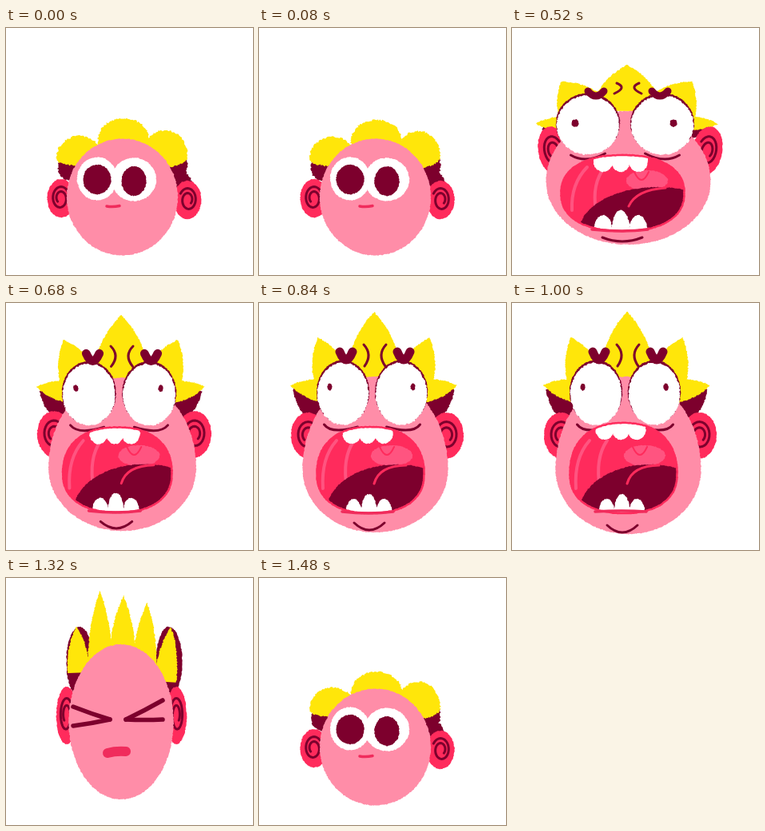
An HTML page with a canvas that plays this animation: 309x309 px, repeating every 1.56 s.

```html
<!DOCTYPE html>
<html lang="en">
<head>
<meta charset="utf-8">
<title>Scream</title>
<style>
html, body { margin: 0; width: 100%; height: 100%; overflow: hidden; background: #fff; }
canvas { display: block; width: 100vw; height: 100vh; }
</style>
</head>
<body>
<canvas id="stage" width="309" height="309"></canvas>
<script>
const ctx = document.getElementById('stage').getContext('2d');
const PINK = '#ff8da8', YELLOW = '#ffe60a', DARK = '#7d002d', RED = '#ff2b5c',
  LIGHT = '#ff5480', LIP = '#f02c5c', WHITE = '#fff';
const LOOP = 1560;

let state = 1;
const seed = n => { state = n * 7919 + 17; };
function rand() {
  state = (state * 1664525 + 1013904223) >>> 0;
  return state / 4294967296;
}
const both = draw => [-1, 1].forEach(draw);

function saved(draw) {
  ctx.save();
  draw();
  ctx.restore();
}

// Path of a function of u in 0..1, with chalky jitter.
function trace(point, steps, fuzz = 0) {
  ctx.beginPath();
  for (let i = 0; i <= steps; i++) {
    const [x, y] = point(i / steps);
    ctx.lineTo(x + (rand() - .5) * fuzz, y + (rand() - .5) * fuzz);
  }
}

function fill(color) {
  ctx.fillStyle = color;
  ctx.fill();
}

function stroke(color, width) {
  ctx.strokeStyle = color;
  ctx.lineWidth = width;
  ctx.lineCap = ctx.lineJoin = 'round';
  ctx.stroke();
}

// Oval whose upper and lower halves differ in height; a power above 2 squares it off.
function eggPath(x, y, rx, top, bottom, fuzz = 1, power = 2) {
  const round = v => Math.sign(v) * Math.abs(v) ** (2 / power);
  trace(u => {
    const c = Math.cos(u * 2 * Math.PI), s = Math.sin(u * 2 * Math.PI);
    return [x + rx * round(c), y + (s < 0 ? top : bottom) * round(s)];
  }, Math.ceil(5 * (rx + (top + bottom) / 2) / 2), fuzz);
  ctx.closePath();
}

function egg(x, y, rx, top, bottom, color, fuzz) {
  eggPath(x, y, rx, top, bottom, fuzz);
  fill(color);
}

const oval = (x, y, rx, ry, color, fuzz) => egg(x, y, rx, ry, ry, color, fuzz);

// Pointed hair tuft from a base centre to its tip.
function petal(x, y, tipX, tipY, half, color) {
  const len = Math.hypot(tipX - x, tipY - y);
  const nx = (y - tipY) / len * half, ny = (tipX - x) / len * half;
  trace(u => {
    const v = 2 * u - 1, s = -Math.sign(v), k = 1 - Math.abs(v);
    const w = s * (1 - k * k), h = 1.2 * k * (1 - k) + k * k;
    return [x + (tipX - x) * h + nx * w, y + (tipY - y) * h + ny * w];
  }, Math.ceil(len * 2), 1.4);
  fill(color);
}

// Stroke from a to c that passes through b.
function bend(ax, ay, bx, by, cx, cy, color, width) {
  ctx.beginPath();
  ctx.moveTo(ax, ay);
  ctx.quadraticCurveTo(2 * bx - (ax + cx) / 2, 2 * by - (ay + cy) / 2, cx, cy);
  stroke(color, width);
}

function ear(side, x, y, rx, ry, lean = 0) {
  saved(() => {
    ctx.translate(x, y);
    ctx.scale(side, 1);
    ctx.rotate(lean);
    oval(0, 0, rx, ry, RED);
    trace(u => {
      const a = -2.6 + u * 9.6, r = .64 - .38 * u;
      return [rx * (.05 + r * Math.cos(a)), ry * r * Math.sin(a)];
    }, 40);
    stroke(DARK, 3);
  });
}

function squint(x, y, gap, reach, up, down, tilt, width) {
  both(s => [up, down].forEach(dy => {
    const endX = x + s * reach, endY = y + dy - s * tilt;
    bend(x + s * gap, y, (x + s * gap + endX) / 2, (y + endY) / 2 + .5, endX, endY, DARK, width);
  }));
}

function calm({ sx = 1, sy = 1, lift = 0 }) {
  saved(() => {
    ctx.translate(147.5, 211);
    ctx.scale(sx, sy);
    ctx.translate(-147.5, -211);
    oval(80, 175, 15, 16, DARK, 2);
    oval(212, 172, 15, 20, DARK, 2);
    oval(219, 194, 13, 14, DARK, 2);
    egg(92, 163 + lift / 2, 29, 28, 9, YELLOW, 2.2);
    egg(147, 140 + lift, 32, 27, 30, YELLOW, 2.2);
    egg(199, 160 + lift / 2, 28, 32, 14, YELLOW, 2.2);
    both(s => ear(s, 148 + s * 79, 214 + s, 17.5, 24));
    oval(145.5, 211.5, 69.5, 73, PINK);
  });
  if (sx > 1) {
    squint(135, 196.5, 3, 49 * sx, -9, 1, 2.5, 4.5);
    bend(125, 222, 134, 222, 143, 221, LIP, 4.5);
  } else {
    both(s => oval(137 + s * 23, 189 + s / 2, 26.5 + s * 1.5, 27, WHITE));
    both(s => oval(137 + s * 23, 190.5 + s, 16.5 - s, 18.5, DARK));
    bend(126, 223, 134, 223.5, 142, 222.5, LIP, 3.5);
  }
}

function squeezed() {
  both(s => oval(148 + s * 56, 105, 16.5, 44, DARK));
  [61, 16, 22, 31, 61].forEach((tipY, i) => {
    const k = i - 2;
    petal(145 + k * 27, 124 + k * 3, 147 + k * 29.5, tipY, 18 - Math.abs(k) * 2, YELLOW);
  });
  both(s => ear(s, 144.5 + s * 68.5, 172, 13, 36));
  oval(144, 180, 65.5, 97, PINK);
  squint(140, 177, 10, 56, -20, 4, 4, 5.5);
  bend(127, 219, 138, 217, 150, 217, LIP, 12);
}

// t = 0 is the wide scream, t = 1 the tall one.
function scream({ t = 1, sy = 1, shake = 0 }) {
  const m = (wide, tall) => wide + (tall - wide) * t;
  const mid = 141.5, top = m(159, 155) - shake * 5, base = m(254, 263);
  const eyeX = m(46.5, 36.5), eyeY = m(121.5, 113.5), rx = m(39, 32), ry = m(37, 39);

  ctx.translate(0, 7);
  ctx.scale(1, sy);
  ctx.translate(0, -7);

  both(s => petal(143.5 + s * m(70, 58), m(125, 134), 143.5 + s * m(106, 101), m(126, 108), m(14, 24), DARK));
  both(s => petal(143.5 + s * m(46, 46), m(118, 108), 143.5 + s * m(82, 70), m(67, 43), m(34, 25), YELLOW));
  petal(144, 104, 144, m(46, 11), m(42, 35), YELLOW);
  both(s => petal(143.5 + s * m(75, 60), m(119, 111), 143.5 + s * m(114, 104), m(120, 103), m(9, 14), YELLOW));
  both(s => ear(s, 148 + s * m(96, 86), m(154, 166), m(19, 22), m(31, 29), m(.2, .05)));
  egg(145.5, m(192, 208), m(103, 91), m(88, 116), m(79, 79) + shake * 2, PINK);

  both(s => {
    const x = mid + s * eyeX, fold = 145 + s * m(14, 14), brow = mid + 3.5 + s * m(40, 36);
    oval(x, eyeY - 2, rx + 1, ry + 1, DARK);
    oval(x, eyeY, rx, ry, WHITE, 1.6);
    oval(mid - 1 + s * m(61.5, 52), m(119, 105), m(4.5, 3), m(4.5, 4.5), DARK);
    bend(brow - m(10, 8), m(79, 61), brow, m(85, 71), brow + m(10, 8), m(79, 61), DARK, m(9, 11));
    bend(fold, m(69, 52), 145 + s * 8, m(75, 65), 145 + s * m(17, 13), m(82, 79), DARK, 3);
    bend(mid + s * m(68, 60), m(159, 152), mid + s * m(48, 45), m(164, 159),
      mid + s * m(25, 18), m(157, 155), DARK, 3);
  });

  const mouthX = m(138.5, 139.5), mouthY = m(207, 214);
  const mouth = () => eggPath(mouthX, mouthY, m(77, 67), mouthY - top, base - mouthY, .6, 2.3);
  mouth();
  fill(RED);
  saved(() => {
    ctx.clip();
    both(s => bend(m(105, 108) + s * 11, m(174, 172), m(92, 96) + s * 13, 198,
      m(90, 95) + s * 15, m(228, 232), LIGHT, 4));
    oval(m(169, 166), 191, 26, 13, LIGHT);
    bend(m(153, 151), 180, m(162, 160), 190, m(171, 169), 180, RED, 2);
    oval(m(182, 172), m(255, 262), m(98, 88), m(56, 60), DARK);
    bend(m(146, 144), m(223, 226), m(162, 157), m(207, 209), m(192, 184), m(200, 203), RED, 3);
    for (let k = -1; k <= 1; k++) {
      const edge = Math.abs(k);
      oval(136 + k * m(22, 20), top + 6 + edge * 2, m(12, 11.5), 15 - edge * 2, WHITE);
      oval(m(136, 137.5) + k * m(22, 19), base, m(11.5, 10), m(26, 24) - edge * 6, WHITE);
    }
  });
  mouth();
  stroke(RED, 2.5);
  bend(m(100, 104), base - 2, 137, base - shake * 3, m(170, 168), base - 2, LIP, 3.5);
  const chin = m(262, 275) + shake * 3;
  bend(m(113, 119), chin, 138, chin + m(5, 9), m(163, 157), chin, DARK, 3);
}

const POSES = [
  [0, calm, {}],
  [80, calm, { lift: 2 }],
  [360, calm, { sx: 1.11, sy: .91 }],
  [440, calm, { sx: 1.2, sy: .83 }],
  [520, scream, { t: 0 }],
  [600, scream, { t: 1.1, sy: 1.05 }],
  [680, scream, { t: .88 }],
  [760, scream, { t: 1.04 }],
  [840, scream, {}],
  [1000, scream, { shake: 1 }],
  [1080, scream, {}],
  [1160, scream, { shake: 1 }],
  [1320, squeezed, {}],
  [1400, calm, { sx: 1.4, sy: .74 }],
  [1480, calm, { lift: 4 }]
];

let shown = null;
function frame() {
  const time = performance.now() % LOOP;
  const pose = POSES.filter(p => p[0] <= time).pop();
  if (pose !== shown) {
    shown = pose;
    seed(pose[0]);
    ctx.fillStyle = WHITE;
    ctx.fillRect(0, 0, 309, 309);
    saved(() => pose[1](pose[2]));
  }
  requestAnimationFrame(frame);
}
frame();
</script>
</body>
</html>
```
